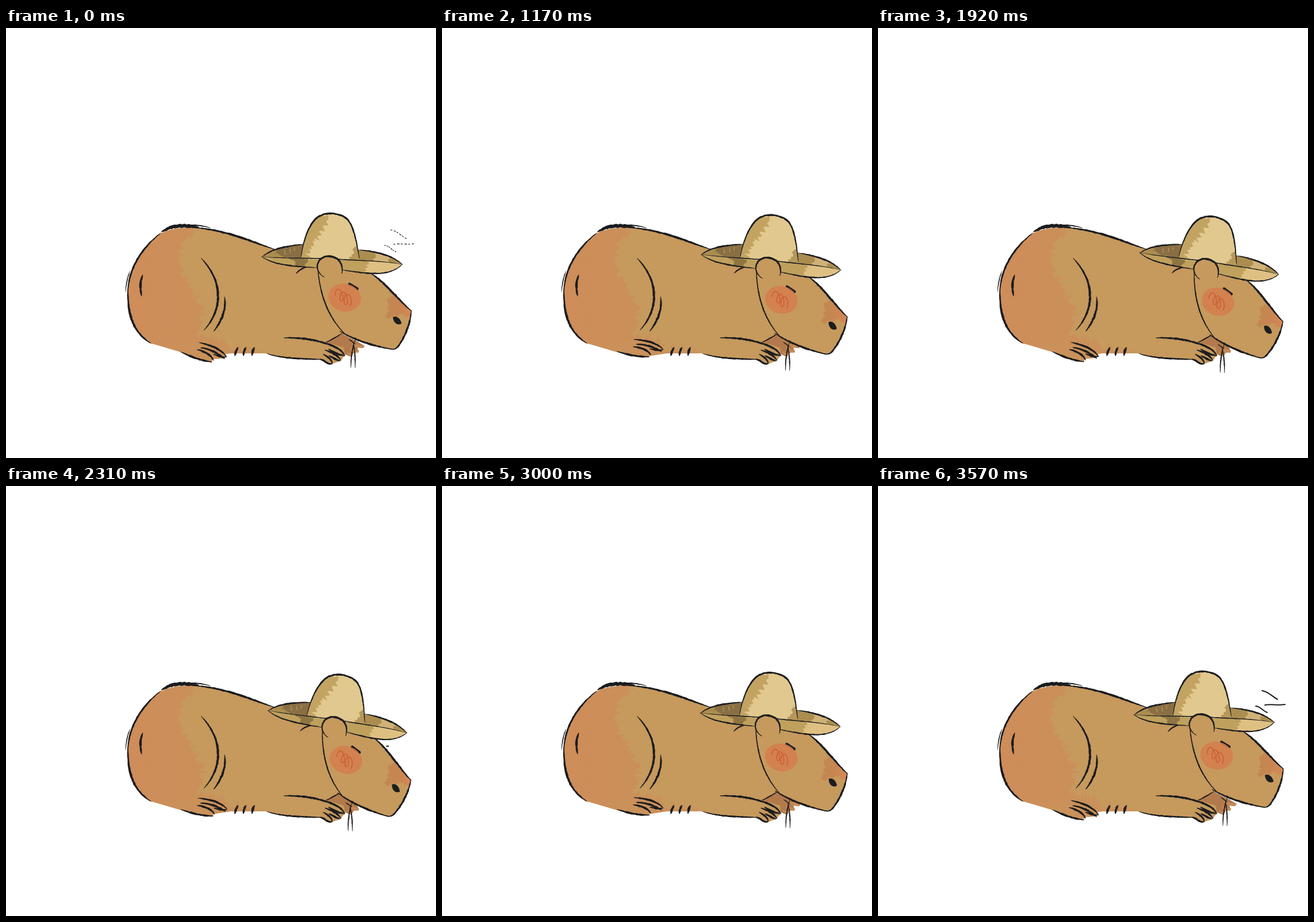
Write an HTML page that moves like this. It is 748 px wide and 748 px high and loops after 3.6 s.

```html
<!DOCTYPE html>
<html lang="en">
<head>
<meta charset="utf-8">
<title>Sleepy capybara</title>
<style>
  html, body { margin: 0; width: 100%; height: 100%; overflow: hidden; background: #fff; }
  svg { display: block; width: 100%; height: 100%; }
  .ink { fill: #1b1c1e; }
  .fur { fill: #c6995d; }
  .line { fill: none; stroke: #1b1c1e; stroke-linecap: round; }
</style>
</head>
<body>
<svg viewBox="0 0 748 748">
  <defs>
    <path id="bodyShape" d="M212 462C212 425 234 382 270 357C290 346 325 346 345 348C390 354 430 373 468 386L545 390L600 470L590 532L555 548L590 566L560 580L550 577C520 575 485 578 453 566L390 566L345 573C310 567 280 556 250 548C222 531 212 498 212 462Z"/>
    <path id="headShape" d="M542 410C543 455 557 503 585 530C610 543 640 552 665 558C674 560 680 556 686 548C696 532 703 518 705 492C682 470 660 441 636 426L580 405Z"/>
    <path id="crownShape" d="M513 402C517 370 527 343 540 331C553 319 580 320 594 333C606 346 610 375 615 404Z"/>
    <path id="backShape" d="M445 398C460 385 490 378 515 377L614 386C645 388 675 397 689 411C655 405 620 405 575 402C540 400 480 401 445 398Z"/>
    <path id="frontShape" d="M445 398C480 401 540 400 575 402C620 405 655 405 689 411C680 422 662 427 645 427C610 427 575 418 540 417C500 415 463 412 445 398Z"/>
    <clipPath id="inBody"><use href="#bodyShape"/></clipPath>
    <clipPath id="inHead"><use href="#headShape"/></clipPath>
    <clipPath id="inCrown"><use href="#crownShape"/></clipPath>
    <clipPath id="inBack"><use href="#backShape"/></clipPath>
    <clipPath id="inFront"><use href="#frontShape"/></clipPath>
    <linearGradient id="rump"><stop stop-color="#cf8c59"/><stop offset=".5" stop-color="#cb8f5a"/><stop offset="1" stop-color="#c9935b"/></linearGradient>
    <linearGradient id="muzzle"><stop stop-color="#c08851"/><stop offset=".5" stop-color="#c98552"/><stop offset="1" stop-color="#da8956"/></linearGradient>
  </defs>

  <!-- body -->
  <use href="#bodyShape" class="fur"/>
  <g clip-path="url(#inBody)">
    <path class="ragged" data-r="15" fill="url(#rump)" d="M200 330L335 345C312 365 298 390 304 420C314 450 338 462 342 490C344 515 325 528 345 536C380 540 388 545 395 556L440 560L440 580L200 580Z"/>
  </g>
  <path class="ink" data-w="3.2" d="M212 464C211 425 232 385 270 356"/>
  <path class="ink" data-w="6.5" d="M270 355C288 343 312 342 336 347"/>
  <path class="ink" data-w="2" d="M312 343C330 342 344 344 356 348"/>
  <path class="ink" data-w="3.6" d="M322 347C380 350 422 370 470 386"/>
  <path class="ink" data-w="3.8" d="M212 452C211 500 222 531 253 549"/>
  <path class="ink" data-w="1.6" d="M208 460C209 444 211 434 216 422"/>
  <path class="ink" data-w="4" d="M238 429C233 442 233 453 236 467"/>
  <path class="ink" data-w="3.8" d="M339 400C378 440 378 490 344 526"/>
  <path class="ink" data-w="3.8" d="M380 467C384 490 374 512 361 528"/>
  <path class="ink" data-w="4" d="M404 555Q399 562 398 571"/>
  <path class="ink" data-w="4" d="M418 555Q413 562 413 571"/>
  <path class="ink" data-w="4" d="M433 555Q428 562 428 571"/>

  <!-- hind foot -->
  <g id="foot">
    <path fill="#ca915a" d="M280 550L335 547C358 551 378 561 384 571L377 575L360 576L357 582C335 577 318 570 297 561Z"/>
    <path class="ink" data-w="3.4" d="M335 547C355 551 376 559 384 573"/>
    <path class="ink" data-w="3.8" d="M338 556C358 559 370 567 381 576"/>
    <path class="ink" data-w="3.2" d="M384 572C376 574 368 570 360 567"/>
    <path class="ink" data-w="3.6" d="M332 559C346 563 358 569 361 579"/>
    <path class="ink" data-w="3.6" d="M303 563C322 572 340 579 359 581"/>
  </g>

  <!-- paws -->
  <path fill="#b27a4c" d="M555 547L583 531L607 543L624 553L621 557L611 556L614 563L605 565L600 572L588 567Z"/>
  <path fill="#c48a5a" d="M600 549L624 553L621 557L609 555ZM597 556L614 561L613 565L602 564ZM591 563L603 568L600 572Z"/>
  <path class="ink" data-w="2" d="M553 548C565 544 575 537 585 531"/>
  <path class="fur" d="M453 566L485 540C525 539 555 545 588 556L589 570L582 579L566 585L550 577C520 575 485 578 453 566Z"/>
  <path class="ink" data-w="3.6" d="M483 539C520 538 543 544 567 552"/>
  <path class="ink" data-w="2.8" d="M453 566C480 576 520 575 552 577"/>
  <path class="ink" data-w="3.4" d="M546 547C566 550 583 557 590 571"/>
  <path class="ink" data-w="3.6" d="M590 570C578 569 570 563 560 558"/>
  <path class="ink" data-w="3.6" d="M554 560C568 564 578 570 583 579"/>
  <path class="ink" data-w="3.4" d="M582 579C574 578 569 573 561 570"/>
  <path class="ink" data-w="3.4" d="M551 567C560 572 569 578 567 585"/>
  <path class="ink" data-w="3.6" d="M545 576C554 577 558 586 568 584"/>

  <g id="head">
    <g id="puffs" class="line" stroke-width="2">
      <path d="M668 356C680 358 685 366 695 371" pathLength="1"/>
      <path d="M673 381C684 379 695 382 708 380" pathLength="1"/>
      <path d="M657 383C665 383 669 391 677 394" pathLength="1"/>
    </g>
    <path class="ink" data-w="2.4" d="M504 428C509 422 514 418 523 416"/>
    <use href="#headShape" class="fur"/>
    <g clip-path="url(#inHead)">
      <path class="ragged" data-r="6" fill="url(#muzzle)" d="M662 476L680 455L712 490L706 506L696 502L688 496L672 503L660 504L667 492Z"/>
    </g>
    <path class="ink" data-w="3.6" d="M630 424C656 438 680 471 706 493"/>
    <path class="ink" data-w="3.3" d="M705 490C704 517 691 542 682 554C677 560 670 560 661 556"/>
    <path class="ink" data-w="3.4" d="M672 559C640 553 610 545 580 527"/>
    <path class="ink" data-w="2.2" d="M542 410C544 460 560 507 595 537"/>
    <path class="ink" data-w="0" d="M673 503C680 499 687 507 688 514C682 518 674 514 673 503Z"/>
    <path class="line" stroke-width="4.8" d="M597.5 445.5L611 453.5"/>
    <ellipse cx="589" cy="469" rx="28.5" ry="24" fill="#d67d4d" opacity=".85" transform="rotate(12 589 469)"/>
    <path fill="none" stroke="#cb5f35" stroke-width="1.6" stroke-linecap="round" d="M573 465C572 456 578 452 582 457C587 464 588 474 584 475C579 475 580 460 587 459C594 462 596 480 591 481C586 480 588 463 594 463C601 465 602 478 599 483"/>
    <g id="strings">
      <path class="ink" data-w="2" d="M608 541C602 556 600 575 600 592"/>
      <path class="ink" data-w="2" d="M604 547C607 560 608 577 607 592"/>
      <path class="ink" data-w="1.6" d="M596 541L608 550"/>
    </g>

    <!-- hat -->
    <use href="#backShape" fill="#ab8d50"/>
    <g clip-path="url(#inBack)">
      <path class="ragged" data-r="5" fill="#8a6f45" d="M467 392L480 375L530 370L525 405L500 400Z"/>
      <path class="ragged" data-r="6" fill="#d0b278" d="M640 405L646 388L672 396L660 412Z"/>
      <path d="M484 386l2 8M494 384l1 8M502 382l0 6" stroke="#b79b62" stroke-width="1.2"/>
    </g>
    <use href="#frontShape" fill="#bfa05c"/>
    <g clip-path="url(#inFront)">
      <path class="ragged" data-r="6" fill="#8f7543" d="M490 397L524 399L520 420L508 420L500 406Z"/>
      <path class="ragged" data-r="7" fill="#dfc083" d="M632 403L695 408L690 430L622 432Z"/>
    </g>
    <path class="ink" data-w="2.8" d="M445 399C460 384 490 379 518 376"/>
    <path class="ink" data-w="2.8" d="M612 386C645 388 675 397 690 412"/>
    <path class="ink" data-w="2.4" d="M444 397C463 412 500 415 542 417"/>
    <path class="ink" data-w="2.5" d="M690 410C680 422 662 427 645 427C620 427 600 423 580 420"/>
    <use href="#crownShape" fill="#e1c88e"/>
    <g clip-path="url(#inCrown)">
      <path class="ragged" data-r="11" fill="#c2a361" d="M505 410L520 345L545 318L562 334L550 352L543 365L528 382L522 410Z"/>
      <path class="ragged" data-r="10" fill="#b6975a" d="M588 410L596 398L606 388L612 370L625 410Z"/>
    </g>
    <path class="ink" data-w="1.8" d="M446 398C480 401 540 400 575 402C620 405 655 405 688 411"/>
    <path class="ink" data-w="3" d="M513 400C518 364 528 341 540 331C553 319 580 320 594 333C606 346 610 375 615 402"/>

    <!-- ear -->
    <path class="fur" d="M541 412C541 403 552 396 563 397C577 398 587 409 585 426L575 440L548 440Z"/>
    <path class="ink" data-w="3.6" d="M543 424C537 404 552 396 563 397C577 398 588 409 584 428"/>
    <path class="ink" data-w="1.8" d="M541 412C541 422 546 430 555 434"/>
  </g>
</svg>
<script>
const LOOP = 3600, PEAK = 2250, STEP = 30, TAP = 1800, PUFF = 900;
const $ = id => document.getElementById(id);
const wave = u => (1 - Math.cos(2 * Math.PI * u)) / 2;

let seed = 7;
const random = () => (seed = seed * 16807 % 2147483647) / 2147483647;
const polygon = points => 'M' + points.map(p => p.map(v => v.toFixed(1))).join('L') + 'Z';

// Point on the path at length s, with the unit normal there.
function sample(path, s) {
  const a = path.getPointAtLength(Math.max(0, s - .5));
  const b = path.getPointAtLength(s + .5);
  const d = Math.hypot(b.x - a.x, b.y - a.y) || 1;
  return { x: (a.x + b.x) / 2, y: (a.y + b.y) / 2, nx: (a.y - b.y) / d, ny: (b.x - a.x) / d };
}

// Turn a centre line into a tapered brush stroke with slightly rough sides.
function brush(path) {
  const width = +path.dataset.w;
  if (!width) return;
  const length = path.getTotalLength(), count = Math.ceil(length / 2.5);
  const left = [], right = [];
  for (let i = 0; i <= count; i++) {
    const u = i / count, { x, y, nx, ny } = sample(path, u * length);
    const half = width / 2 * (.15 + .85 * Math.sin(Math.PI * u) ** .6);
    const l = half * (.75 + .5 * random()), r = half * (.75 + .5 * random());
    left.push([x + nx * l, y + ny * l]);
    right.unshift([x - nx * r, y - ny * r]);
  }
  path.setAttribute('d', polygon([...left, ...right]));
}

// Break up the edge of a colour patch like a dry brush.
function fray(path) {
  const reach = +path.dataset.r, length = path.getTotalLength(), points = [];
  for (let s = 0; s < length; s += 3) {
    const { x, y, nx, ny } = sample(path, s), k = reach * (random() - .5);
    points.push([x + nx * k, y + ny * k]);
  }
  path.setAttribute('d', polygon(points));
}

document.querySelectorAll('.ink').forEach(brush);
document.querySelectorAll('.ragged').forEach(fray);

function drawPuffs(t) {
  const phase = (t + PUFF - 60) % PUFF + 60;
  const age = phase - 870, grown = Math.min(1, Math.max(0, (phase - 490) / 220));
  const fading = phase >= PUFF;
  const puffs = $('puffs');
  puffs.setAttribute('visibility', grown ? 'visible' : 'hidden');
  puffs.setAttribute('transform', `translate(${age * .045} ${-age * .158})`);
  puffs.setAttribute('stroke-width', fading ? 1.2 : 2);
  puffs.setAttribute('stroke-dasharray', fading ? '.06 .12 .1 .09' : `${grown} 2`);
}

function draw(now) {
  const t = Math.floor(now % LOOP / STEP) * STEP;
  const nod = 6.1 * wave(t < PEAK ? t / PEAK / 2 : (LOOP - t) / (LOOP - PEAK) / 2);
  $('head').setAttribute('transform', `rotate(${nod} 520 495)`);
  $('strings').setAttribute('transform', `rotate(${-1.2 * nod} 606 545)`);
  $('foot').setAttribute('transform', `rotate(${-11 * wave(t / TAP)} 300 558)`);
  drawPuffs(t);
}

const start = performance.now();
function tick() {
  draw(performance.now() - start);
  requestAnimationFrame(tick);
}
tick();
</script>
</body>
</html>
```
